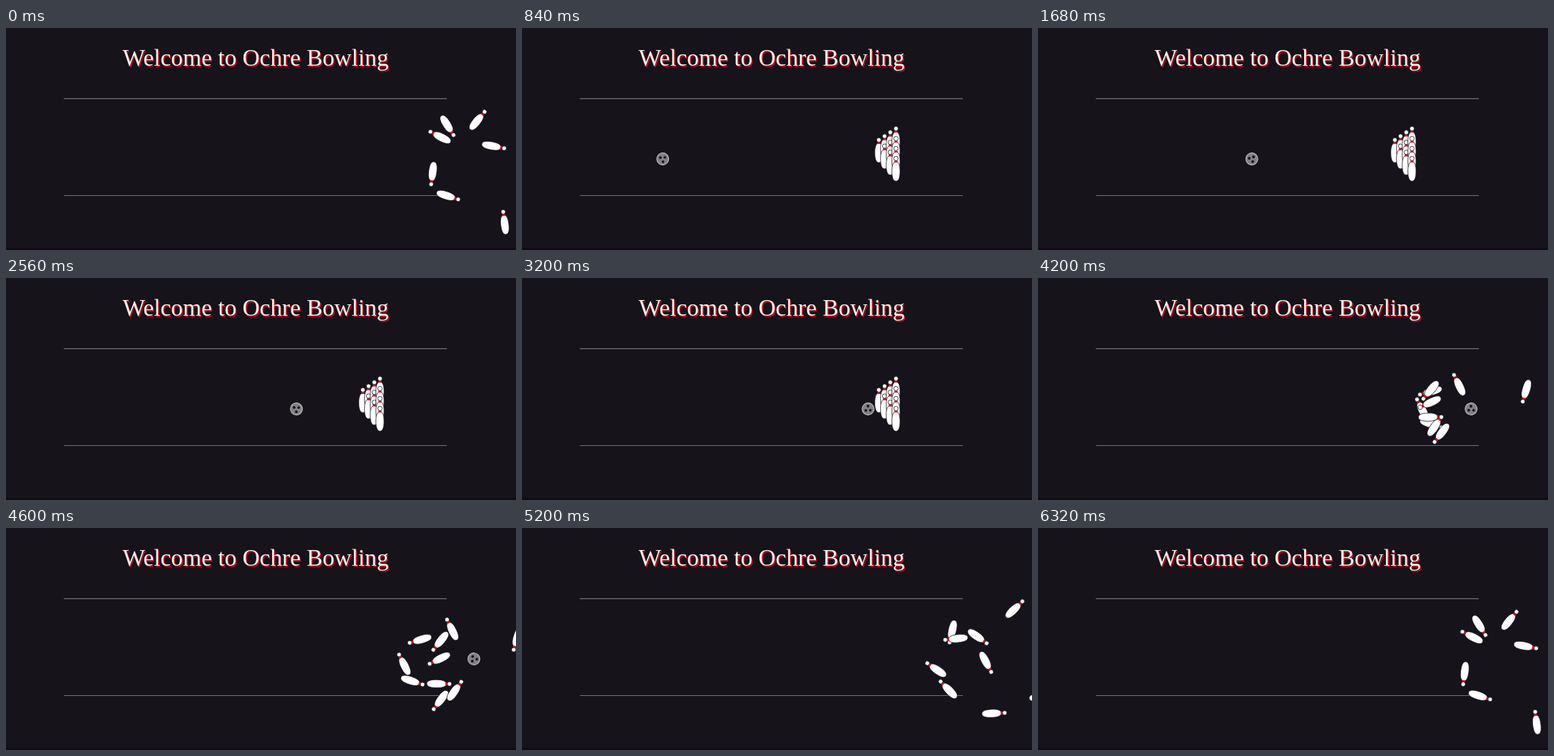
Animation, 715 px wide and 312 px high, one loop 6.36 s. Source, as an HTML page:

```html
<!DOCTYPE html>
<html lang="en">
<head>
<meta charset="utf-8">
<title>Bowling</title>
<style>
  html, body { margin: 0; width: 100%; height: 100%; overflow: hidden; background: #16131a; }
  svg { display: block; width: 715px; height: 312px; }
  h1 {
    position: absolute; left: 0; top: 22px; width: 700px; margin: 0;
    font: 400 33.4px/40px "Liberation Serif", serif;
    text-align: center; white-space: nowrap;
    color: #fff0ee; text-shadow: 1.5px 2px 0 #b5101c;
  }
</style>
</head>
<body>
<h1>Welcome to Ochre Bowling</h1>
<svg viewBox="0 0 715 312">
  <defs>
    <g id="pin" stroke="#16131a" stroke-width=".8">
      <path d="M0 -11.2C3.8 -11.2 5.7 -6 5.7 2S4.4 16.2 0 16.2S-5.7 10 -5.7 2S-3.8 -11.2 0 -11.2Z" fill="#fff"/>
      <path d="M-1.6 -13.5H1.6L2.7 -10H-2.7Z" fill="#e0101c" stroke="none"/>
      <circle cy="-15.7" r="3.1" fill="#fff"/>
    </g>
  </defs>
  <rect y="309" width="715" height="3" fill="#100c10"/>
  <path d="M81 99.3H618M81 235.5H618" stroke="#747277" stroke-width="1.2"/>
  <g id="pins"></g>
  <g id="ball">
    <circle r="8.4" fill="#838085" stroke="#c8c6ca"/>
    <g fill="#151318">
      <circle cx="-3.2" cy="-2" r="1.9"/>
      <circle cx="3.2" cy="-2" r="1.9"/>
      <circle cy="4" r="1.9"/>
    </g>
  </g>
</svg>
<script>
const LOOP = 6360, RESET = 40, SPREAD = 4600, STOP = 5840;
const ROLL = 0.122, SPIN = 0.84;

// Per pin, in rack order: [x, y, angle] when spread out, then [dx, dy, turn] until rest.
const throws = [
  [[716, 156, -164], [110, 5, -90]],
  [[625, 143, -26], [113, -50, 124]],
  [[569, 215, 108], [50, 21, 360]],
  [[581, 157, -106], [38, -20, -106]],
  [[558, 192, -27], [40, 12, 574]],
  [[609, 242, -143], [90, 32, -224]],
  [[609, 159, -141], [0, -6, 78]],
  [[608, 184, -116], [53, -54, -205]],
  [[606, 219, 90], [77, -53, 731]],
  [[629, 229, 35], [170, 17, 95]]
];

const layer = document.getElementById("pins");
const ball = document.getElementById("ball");

const pins = [];
for (let col = 0; col < 4; col++) {
  for (let row = 0; row <= col; row++) {
    const el = document.createElementNS("http://www.w3.org/2000/svg", "use");
    el.setAttribute("href", "#pin");
    layer.append(el);
    const [spread, drift] = throws[pins.length];
    pins.push({
      el, col, spread, drift,
      home: [500.3 + 8 * col, 173 - 5.3 * col + 14 * row],
      hit: 3270 + 50 * col * col
    });
  }
}

const progress = (t, from, to) => Math.min(1, Math.max(0, (t - from) / (to - from)));
const easeOut = (u, power) => 1 - (1 - u) ** power;
const mix = (a, b, k) => a + (b - a) * k;

// A struck pin tips over at once, flies apart, then slides to rest.
function pose({ col, spread, drift, home, hit }, t) {
  if (t < SPREAD) {
    const u = progress(t, hit, SPREAD);
    const k = u ** (0.45 + 0.5 * col);
    return [
      mix(home[0], spread[0], k),
      mix(home[1], spread[1], k),
      spread[2] * easeOut(u, 6)
    ];
  }
  const k = easeOut(progress(t, SPREAD, STOP), 1.3);
  return spread.map((v, i) => v + drift[i] * k);
}

function place(el, x, y, angle) {
  el.setAttribute("transform", `translate(${x} ${y}) rotate(${angle})`);
}

function draw(t) {
  const time = t < RESET ? LOOP : t;
  for (const pin of pins) place(pin.el, ...pose(pin, time));
  place(ball, 407 + (time - 2560) * ROLL, 184, (time - 2560) * SPIN);
}

const start = performance.now();
function tick() {
  draw((performance.now() - start) % LOOP);
  requestAnimationFrame(tick);
}
tick();
</script>
</body>
</html>
```
